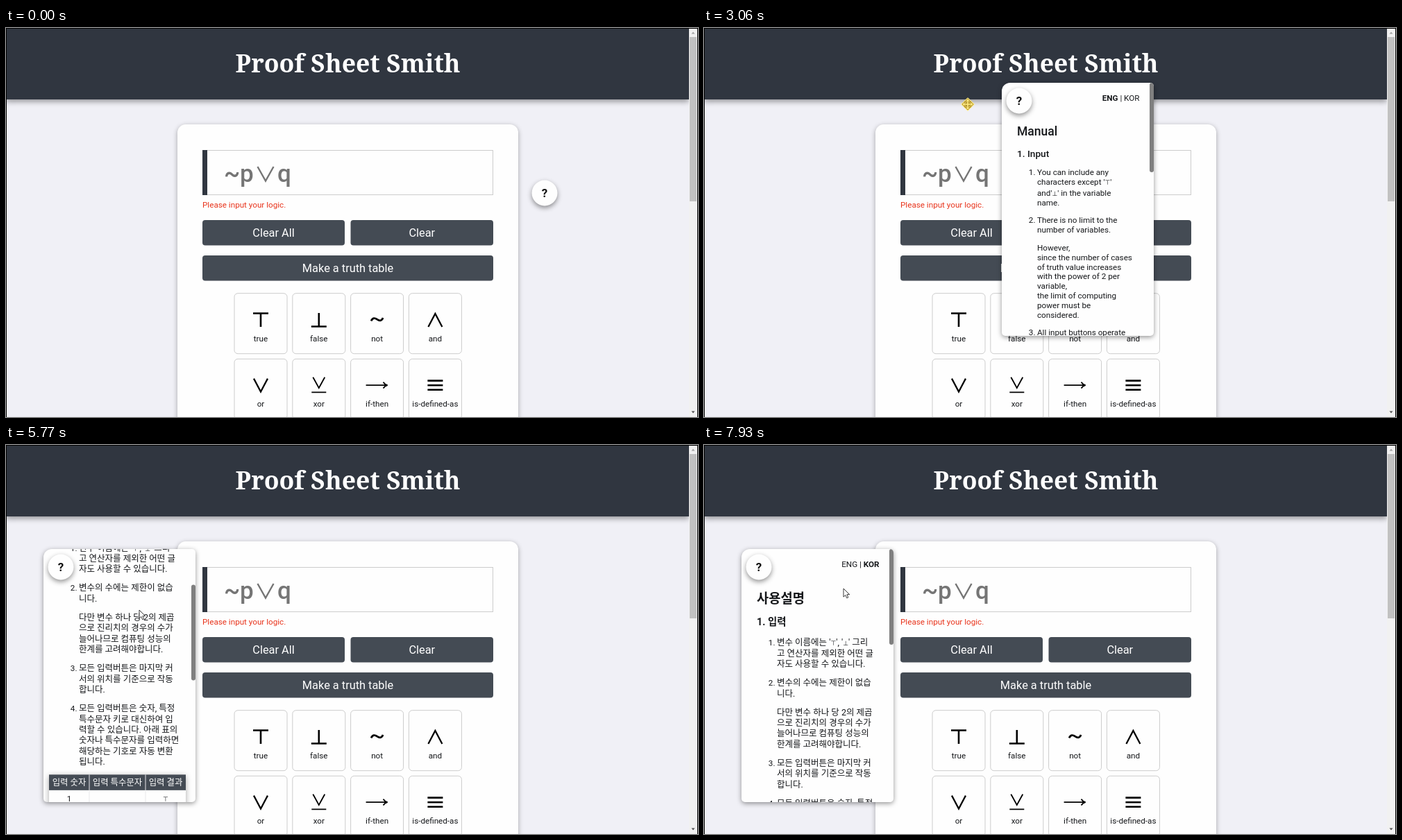
Write an HTML page that moves like this. It is 997x561 px and loops after 8000 ms.

```html
<!DOCTYPE html>
<html lang="en">
<head>
<meta charset="utf-8">
<title>Proof Sheet Smith</title>
<style>
html, body { margin: 0; width: 100%; height: 100%; overflow: hidden; }
body, text { font-family: Roboto, "Noto Sans CJK KR", "Noto Sans CJK", "DejaVu Sans", sans-serif; }
div, svg { position: absolute; }
svg { left: 0; top: 0; overflow: visible; }
text { white-space: pre; }
#stage { left: 0; top: 0; width: 997px; height: 561px; overflow: hidden; background: #f0f0f6; }
#head { left: 0; top: 0; width: 984px; height: 103px; background: #303640; box-shadow: 0 3px 8px rgba(0,0,0,.4); }
#card { left: 246.5px; top: 139px; width: 491.5px; height: 460px; border-radius: 12px; background: #fefefe; box-shadow: 0 2px 7px rgba(0,0,0,.33); }
#bar { left: 984px; top: 0; width: 13px; height: 561px; background: #f1f1f1; }
#panel { overflow: hidden; border-radius: 12px 5px 5px 5px; background: #fefefe; box-shadow: 0 2px 7px rgba(0,0,0,.42); }
#thumb { left: 213px; width: 6px; border-radius: 3px; background: #7f7f7f; }
#help { width: 37px; height: 37px; border-radius: 50%; background: #fefefe; box-shadow: 0 3px 7px rgba(0,0,0,.42); }
#edge { left: 0; top: 0; width: 995px; height: 561px; border: solid #000; border-width: 1px 1px 0; }
</style>
</head>
<body>
<div id="stage">
  <div id="card"></div>
  <div id="head"></div>
  <svg id="page" width="997" height="561"></svg>
  <div id="bar"><svg width="13" height="561">
    <rect x="1" y="13" width="10" height="237" fill="#c1c1c1"/>
    <path d="M3.5 8.5h5l-2.5-3z" fill="#a3a3a3"/>
    <path d="M3.5 552.5h5l-2.5 3z" fill="#505050"/>
  </svg></div>
  <div id="panel">
    <svg id="en" width="219" height="967"></svg>
    <svg id="ko" width="219" height="967" lang="ko"></svg>
    <div id="thumb"></div>
  </div>
  <div id="help"><svg width="37" height="37"><text x="18.5" y="24.5" text-anchor="middle" font-size="17" font-weight="700" fill="#111">?</text></svg></div>
  <div id="edge"></div>
  <svg id="cursor" width="1" height="1" stroke="#222" stroke-width=".9" fill="#fff">
    <path id="arrow" d="M.5.5V12.6L3.3 10 5.2 14.2 7.3 13.3 5.4 9.2H9.2Z"/>
    <path id="hand" transform="translate(-1 -6)" d="M-1.4 8V1Q0-.8 1.4 1V5.2Q2.8 4.2 4 5.6 5.4 4.8 6.4 6.3 8 6 8.2 7.8V11Q7.8 13.6 6.4 15.4H-.6Q-2 12.6-5 9.4-4.6 7.2-2.6 8.2L-1.4 9.4Z"/>
    <g id="move"></g>
  </svg>
</div>
<script>
const $ = id => document.getElementById(id);
const INK = '#15171a', SLATE = '#444b54', BODY = 11.68, PITCH = 22.95;
const MID = 'text-anchor="middle"', END = 'text-anchor="end"', BOLD = 'font-weight="700"', MEDIUM = 'font-weight="500"';

const txt = (x, y, s, size = BODY, attrs = '') =>
  `<text x="${x}" y="${y}" font-size="${size}" fill="${INK}" ${attrs}>` +
  s.replace(/[⊤⊥]/g, c => `<tspan font-size="9" font-family="DejaVu Sans, sans-serif">${c}</tspan>`) + '</text>';
const rect = (x, y, w, h, attrs) => `<rect x="${x}" y="${y}" width="${w}" height="${h}" ${attrs}/>`;
const line = (d, w, color = '#000') => `<path d="${d}" fill="none" stroke="${color}" stroke-width="${w}"/>`;
const turn = (angle, s) => `<g transform="rotate(${angle})">${s}</g>`;

function buildPage() {
  const button = (x, y, w, label) =>
    rect(x, y, w, 36.4, `rx="4" fill="${SLATE}"`) +
    txt(x + w / 2, y + 24, label, 16.35, `${MID} style="fill:#fff"`);
  const grey = `style="fill:#757575" ${MEDIUM}`;

  let s = txt(492.5, 64, 'Proof Sheet Smith', 35.6, `${MID} ${BOLD} style="fill:#fff;font-family:'Noto Serif',serif"`);
  s += rect(283.5, 176.5, 418, 64, 'fill="#fefefe" stroke="#ccc"') + rect(283, 176, 7, 65, 'fill="#303640"');
  s += txt(314, 222, '~', 35, grey) + txt(337, 222, 'p', 35, grey) + txt(391, 222, 'q', 35, grey);
  s += line('M362.5 200L374 220.5 385.5 200', 2.4, '#757575');
  s += txt(283, 259.3, 'Please input your logic.', BODY, 'style="fill:#e8341c"');
  s += button(283, 277, 205, 'Clear All') + button(496.5, 277, 205.5, 'Clear') + button(283, 328, 419, 'Make a truth table');

  // Icons are drawn around the middle of their key.
  const tee = line('M-11-9.5H11M0-9.5V10', 2.6), wedge = line('M-10 10L0-9 10 10', 2.3);
  const keys = {
    'true': tee,
    'false': turn(180, tee),
    'not': line('M-8.5 1.6C-6.5-3.6-3-3 0-.8S6.5 2 8.5-3', 2.8),
    'and': wedge,
    'or': turn(180, wedge),
    'xor': line('M-8.5-12L0 3.5 8.5-12M-10.5 9.8H10.5', 1.9),
    'if-then': line('M-16-.5H14M9-5Q11-1.5 15-.5 11 .5 9 4', 1.8),
    'is-defined-as': line('M-11-7H11M-11-.4H11M-11 6.2H11', 2.6)
  };
  Object.entries(keys).forEach(([label, icon], i) => {
    const x = 329 + (i % 4) * 83.8, y = 382.7 + (i >> 2) * 94.6, cx = x + 38;
    s += rect(x, y, 76, 87, 'rx="5" fill="#fefefe" stroke="#ccc"');
    s += `<g transform="translate(${cx} ${y + 38.3})">${icon}</g>` + txt(cx, y + 69, label, BODY, MID);
  });
  $('page').innerHTML = s;
}

// Numbered paragraphs, "/" breaks a line, a leading "+" continues the item above.
function flow(y, size, pitch, gap, items) {
  let s = '', n = 0;
  for (const item of items) {
    if (item[0] !== '+') s += txt(48.5, y, ++n + '.', BODY, END);
    item.replace('+', '').split('/').forEach((words, i) => {
      if (i) y += pitch + (words.includes('⊥') ? 2.4 : 0);
      s += txt(51, y, words, size);
    });
    y += gap;
  }
  return s;
}

function buildEnglish() {
  $('en').innerHTML =
    txt(198.5, 25.5, `<tspan ${BOLD}>ENG</tspan> | KOR`, BODY, END) +
    txt(22, 75.5, 'Manual', 17.5, MEDIUM) + txt(22, 106.7, '1. Input', 13.66, MEDIUM) +
    flow(133, BODY, 13.86, 25.5, [
      "You can include any/characters except '⊤'/and'⊥' in the variable/name.",
      'There is no limit to the/number of variables.',
      '+However,/since the number of cases/of truth value increases/with the power of 2 per/variable,/the limit of computing/power must be/considered.',
      'All input buttons operate'
    ]);
}

function buildKorean() {
  $('ko').innerHTML =
    txt(198.5, 25.5, `ENG | <tspan ${BOLD}>KOR</tspan>`, BODY, END) +
    txt(22, 77.8, '사용설명', 18.75, BOLD) +
    txt(22, 110, '1. 입력', 14.4, BOLD) +
    flow(139.2, 12.5, 15.4, 27.1, [
      "변수 이름에는 '⊤', '⊥' 그리/고 연산자를 제외한 어떤 글/자도 사용할 수 있습니다.",
      '변수의 수에는 제한이 없습/니다.',
      '+다만 변수 하나 당 2의 제곱/으로 진리치의 경우의 수가/늘어나므로 컴퓨팅 성능의/한계를 고려해야합니다.',
      '모든 입력버튼은 마지막 커/서의 위치를 기준으로 작동/합니다.',
      '모든 입력버튼은 숫자, 특정/특수문자 키로 대신하여 입/력할 수 있습니다. 아래 표의/숫자나 특수문자를 입력하면/해당하는 기호로 자동 변환/됩니다.'
    ]) +
    shortcuts() +
    txt(22, 756.5, '2. 결과', 14.4, BOLD) +
    flow(785, 12.5, 15.4, 27.1, [
      '변수 별 진리치 할당으로 해/당하는 데이터만 하이라이/트할 수 있습니다.',
      '표의 머리글을 누르면 해당/하는 열만 따로 확인할 수/있습니다.',
      '결과 표는 새로운 논리식을/입력할 때까지 그대로 유지/됩니다.'
    ]);
}

function shortcuts() {
  const marks = ['', '', '!', '&amp;', '|', '^', '&gt;', '='];
  const center = i => 37 + i * 69.5;
  let s = rect(8, 462, 197, 252, 'fill="#fefefe" style="filter:drop-shadow(0 2px 4px rgba(0,0,0,.35))"');
  s += rect(8, 462, 197, 22.5, `fill="${SLATE}"`);
  ['입력 숫자', '입력 특수문자', '입력 결과'].forEach((h, i) => {
    s += txt(center(i), 477.8, h, 12.4, `${MID} style="fill:#fff"`);
  });
  [...'⊤⊥~∧∨⊻→≡()'].forEach((result, i) => {
    const y = 500.3 + i * PITCH;
    [String((i + 1) % 10), marks[i] || '', result].forEach((cell, c) => {
      s += txt(center(c), y, cell, /[∧∨⊻→≡]/.test(cell) ? 9.5 : BODY, MID);
    });
    if (i) s += line(`M8 ${y - 16}H205`, 1, '#ececef');
  });
  return s + line('M66 462V713M147 462V713', 1, '#e8e8eb') + line('M8 713.5H205', 2, '#303640');
}

function buildMoveCursor() {
  const arm = line('M-4.2-4.2L-1.3-1.3V-4.4H-3.6L0-8 3.6-4.4H1.3V-1.3L4.2-4.2', .8, '#a07f1c');
  $('move').innerHTML =
    '<path d="M0-8.5L8.5 0 0 8.5-8.5 0Z" fill="#fbe67c" stroke="#fbe67c" stroke-width="2" stroke-linejoin="round"/>' +
    [0, 90, 180, 270].map(a => turn(a, arm)).join('');
}

// Motion
const LOOP = 8000, STEP = 70, ENTER = 570, GRAB = 2420, SETTLE = 3750, DROP = 4080, SWITCH = 5040;
const clamp = (v, lo, hi) => Math.min(hi, Math.max(lo, v));
const ramp = (t, from, to) => clamp((t - from) / (to - from), 0, 1);

// Pointer path: time, x, y
const path = [
  [ENTER, 709, 510], [1340, 775, 236], [GRAB, 775, 240],
  [2630, 752, 164], [2700, 731, 149], [2980, 453, 107], [3050, 380, 110], [3540, 89, 165], [SETTLE, 78, 178],
  [4340, 78, 178], [4520, 279, 174], [4730, 272.5, 174], [4870, 241, 172], [5080, 241, 172],
  [5290, 191.5, 237.5], [7110, 191.5, 237.5], [7880, 200.5, 206.5]
];

function pointer(t) {
  const i = clamp(path.findIndex(p => p[0] > t), -1, path.length);
  const b = path.at(i), a = path[Math.max(0, (i < 0 ? path.length : i) - 1)];
  const p = a === b ? 0 : ramp(t, a[0], b[0]);
  return [a[1] + (b[1] - a[1]) * p, a[2] + (b[2] - a[2]) * p];
}

// The panel hangs from the pointer, one step late, while it is dragged.
function corner(t) {
  const [x, y] = pointer(clamp(t - STEP, GRAB, SETTLE));
  return [Math.round(x - 24), Math.round(y - 28)];
}

const scrolled = t => 441 * ramp(t, 5490, 6200) + 161 * ramp(t, 6500, 6920) - 602 * ramp(t, 7110, 7880);

function cursorKind(t, dx, dy) {
  if (t < ENTER) return '';
  if (t >= GRAB && t < DROP) return 'move';
  const onHelp = Math.hypot(dx - 25, dy - 26) < 18.5;
  const onLanguage = t < SWITCH + STEP && dx > 144 && dx < 199 && dy > 14 && dy < 30;
  return onHelp || onLanguage ? 'hand' : 'arrow';
}

const move = (id, x, y) => { $(id).style.transform = `translate(${x}px,${y}px)`; };
const show = (id, on) => { $(id).style.display = on ? '' : 'none'; };

function draw(time) {
  const t = GRAB + Math.floor((time - GRAB) / STEP) * STEP;
  const [x, y] = corner(t), [px, py] = pointer(t);
  const open = ramp(t, 1510, 1720), top = scrolled(t), korean = t >= SWITCH;

  show('panel', open > 0);
  move('panel', x, y);
  $('panel').style.width = 219 * open + 'px';
  $('panel').style.height = 364.5 * open + 'px';
  move('help', x + 6.5, y + 7.5);
  show('en', !korean);
  show('ko', korean);
  move('ko', 0, -top);
  $('thumb').style.height = (korean ? 137.5 : 129) + 'px';
  move('thumb', 0, top * 364.5 / 967);

  const kind = cursorKind(t, px - x, py - y);
  for (const k of ['arrow', 'hand', 'move']) show(k, k === kind);
  move('cursor', px, py);
}

buildPage();
buildEnglish();
buildKorean();
buildMoveCursor();

const began = performance.now();
function tick() {
  draw((performance.now() - began) % LOOP);
  requestAnimationFrame(tick);
}
tick();
</script>
</body>
</html>
```
